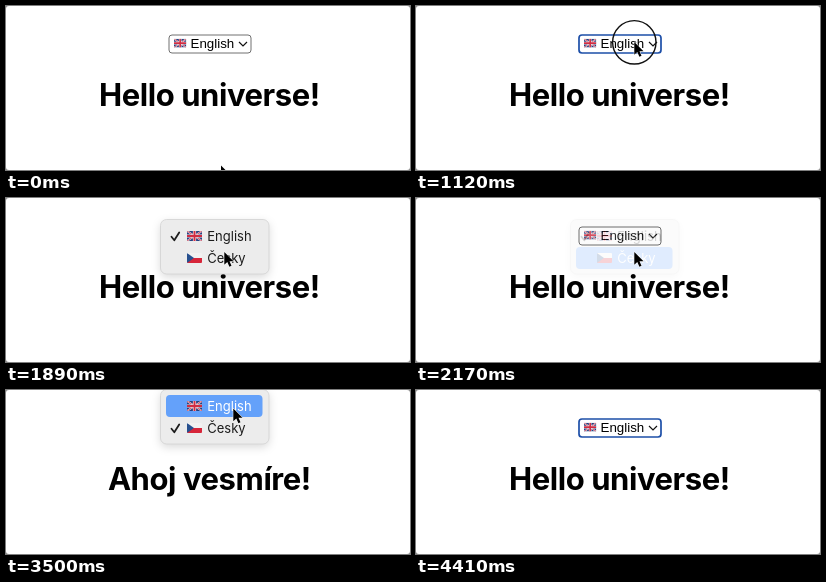
These frames come from a looping animation (404 by 164 pixels, 5110 ms). An HTML page:

```html
<!DOCTYPE html>
<html lang="en">
<head>
<meta charset="utf-8">
<title>Language switch</title>
<style>
  html, body { margin: 0; height: 100%; overflow: hidden; background: #8a8a8a; }
  svg { display: block; }
  #stage { width: 100%; height: 100%; }
  #title { font: bold 31px Inter, sans-serif; letter-spacing: -.43px; text-anchor: middle; }
  #label { font: 13.33px "Liberation Sans", Arial, sans-serif; }
  #menu { font: 13px Inter, sans-serif; filter: drop-shadow(0 3px 4px rgba(0, 0, 0, .14)); }
  .bar { fill: #64a1fa; stroke: none; opacity: 0; }
  .row { fill: #1c1c1c; stroke: #1c1c1c; }
  .row text { stroke: none; }
  .row.active { fill: #fff; stroke: #fff; }
  .active .bar { opacity: 1; }
  .tick { fill: none; stroke-width: 1.8; stroke-linecap: round; stroke-linejoin: round; }
</style>
</head>
<body>
<svg id="stage" viewBox="0 0 404 164">
  <defs>
    <clipPath id="flagShape"><rect width="15" height="10" rx="1"/></clipPath>
    <g id="flag0" clip-path="url(#flagShape)" fill="none" stroke="none">
      <path fill="#27407f" d="M0 0h15v10H0z"/>
      <path stroke="#f2f0f2" stroke-width="1.7" d="M0 0l15 10M0 10L15 0"/>
      <path stroke="#d0344a" stroke-width=".9" d="M0 0l15 10M0 10L15 0"/>
      <path stroke="#f2f0f2" stroke-width="3.2" d="M7.5 0v10M0 5h15"/>
      <path stroke="#d02c42" stroke-width="2" d="M7.5 0v10M0 5h15"/>
    </g>
    <g id="flag1" clip-path="url(#flagShape)" stroke="none">
      <path fill="#f1f1f1" d="M0 0h15v5H0z"/>
      <path fill="#d7263a" d="M0 5h15v5H0z"/>
      <path fill="#27508f" d="M0 0l7 5-7 5z"/>
    </g>
  </defs>

  <rect width="404" height="164" rx="3" fill="#fff"/>
  <text id="title" x="203.4" y="100"></text>

  <rect id="box" x="163" y="29" width="82" height="18" rx="3" fill="#fff"/>
  <use id="flag" transform="translate(168 32.8) scale(.82 .88)"/>
  <text id="label" x="184.5" y="42.2"></text>
  <path d="M233 36l4 4 4-4" fill="none" stroke="#111" stroke-width="1.2"/>

  <g id="menu">
    <rect x="154.5" y="21.5" width="108.5" height="54.5" rx="6" fill="#ececec" stroke="#cfcfcf" stroke-width=".7"/>
  </g>

  <circle id="ring" r="21.7" fill="none" stroke="#111" stroke-width="1.4"/>
  <path id="cursor" d="M0 0V12.8L3 10 5.1 14.8 7.2 13.8 5.2 9.2H9.2Z"
        fill="#000" stroke="#fff" stroke-width="1" paint-order="stroke"/>
</svg>

<script>
const LOOP = 5110, STEP = 70;
const $ = id => document.getElementById(id);
const set = (id, attrs) => {
  for (const name in attrs) $(id).setAttribute(name, attrs[name]);
};

const languages = [
  { name: "English", title: "Hello universe!" },
  { name: "Česky", title: "Ahoj vesmíre!" },
];

// [time, x, y] of the pointer tip
const path = [
  [0, 215, 159.5], [70, 216, 150], [140, 222, 112], [210, 232, 66], [350, 252, 9],
  [420, 244, 15], [490, 227, 29], [560, 218.3, 36], [1330, 218.3, 36], [1680, 218.3, 54],
  [2520, 218.3, 54], [2730, 222.3, 34], [3080, 222.3, 34], [3430, 227.3, 18.5], [4060, 227.3, 18.5],
  [4130, 226, 30], [4200, 223, 60], [4270, 219, 95], [4340, 217, 119], [4410, 216, 170],
  [LOOP, 216, 170],
];

// One entry per opening of the menu
const visits = [
  { press: 980, open: 1190, blink: 1890, close: 2240, from: 0 },
  { press: 2800, open: 2870, blink: 3570, close: 3920, from: 1 },
];

const rows = languages.map(({ name }, i) => {
  const row = document.createElementNS("http://www.w3.org/2000/svg", "g");
  row.setAttribute("transform", `translate(0 ${27 + 22 * i})`);
  row.innerHTML = `<rect class="bar" x="160" width="96.5" height="22" rx="4"/>
    <path class="tick" d="M165.5 11.8l2.8 3.4 4.9-7.8"/>
    <use href="#flag${i}" x="181" y="6"/>
    <text x="201.3" y="15.8">${name}</text>`;
  $("menu").append(row);
  return row;
});

const clamp = v => Math.max(0, Math.min(1, v));

function pointerAt(t) {
  const i = path.findIndex(p => p[0] > t);
  const [t0, x0, y0] = path[i - 1], [t1, x1, y1] = path[i];
  const k = (t - t0) / (t1 - t0);
  return [x0 + (x1 - x0) * k, y0 + (y1 - y0) * k];
}

function draw(t) {
  const [x, y] = pointerAt(t);
  const visit = visits.find(v => t >= v.open && t < v.close);
  const current = t >= visits[0].close && t < visits[1].close ? 1 : 0;

  $("title").textContent = languages[current].title;
  $("label").textContent = languages[current].name;
  set("flag", { href: "#flag" + current });

  const focused = t >= visits[0].press && !visit;
  const hovered = visit || (x > 162 && x < 246 && y > 28 && y < 48);
  set("box", {
    stroke: focused ? "#1d4fa8" : hovered ? "#4f4f4f" : "#707070",
    "stroke-width": focused ? 1.7 : 1,
  });

  let opacity = 0;
  if (visit) {
    opacity = t < visit.blink + 140 ? 1 : (visit.close - t) / 360;
    const shift = -22 * visit.from;
    set("menu", { transform: `translate(0 ${shift})` });
    const over = y - shift < 49 ? 0 : 1;
    rows.forEach((row, i) => {
      row.setAttribute("class", i === over && t !== visit.blink ? "row active" : "row");
      row.querySelector(".tick").style.opacity = i === visit.from ? 1 : 0;
    });
  }
  $("menu").style.opacity = opacity;

  const ring = Math.max(...visits.map(({ press }) =>
    Math.min(clamp((t - press + STEP) / 140), clamp((press + 280 - t) / 140))));
  set("ring", { cx: x, cy: y + .3, opacity: ring });
  set("cursor", { transform: `translate(${x} ${y})` });
}

const start = performance.now();
function tick() {
  const t = (performance.now() - start) % LOOP;
  draw(Math.floor(t / STEP) * STEP);
  requestAnimationFrame(tick);
}
tick();
</script>
</body>
</html>
```
